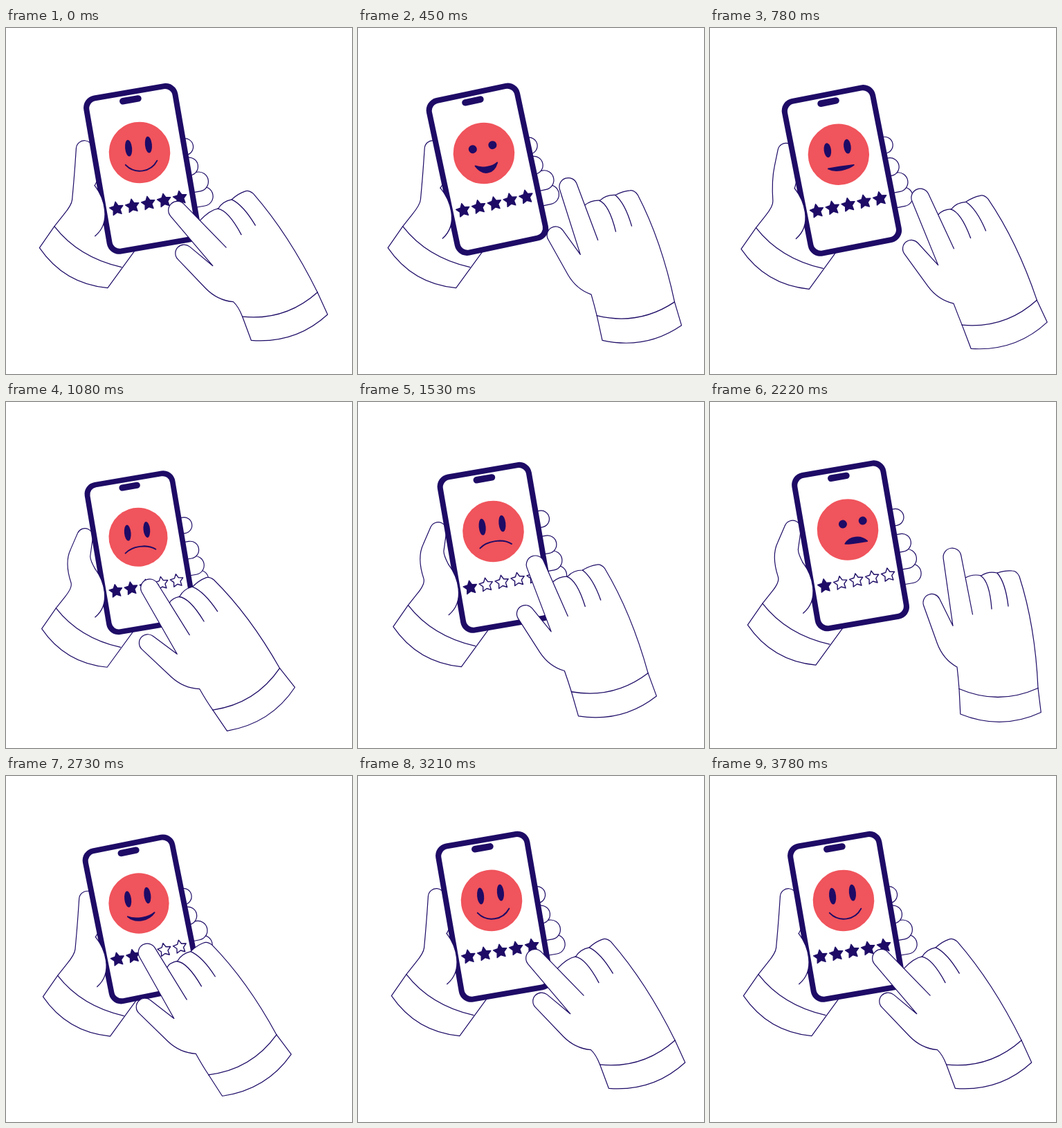
These frames come from a looping animation (500x500 px, 3.81 s). An HTML page with a canvas:

```html
<!DOCTYPE html>
<html lang="en">
<head>
<meta charset="utf-8">
<title>Rating by phone</title>
<style>
html, body { margin: 0; width: 100%; height: 100%; overflow: hidden; background: #fff; }
canvas { display: block; width: 500px; height: 500px; }
</style>
</head>
<body>
<canvas id="stage" width="500" height="500"></canvas>
<script>
const LOOP = 3810, NAVY = '#1e0b66', RED = '#f0545c', RAD = Math.PI / 180;
const PIVOT = 155; // distance from the face down to the point the phone tilts around
const ctx = document.getElementById('stage').getContext('2d');

// grip: pivot x, y, tilt, scale. hand: little finger x, y, palm angle, wrist bend.
// face: mood, width, look. curl: how far the left thumb bends.
const poses = {
  press: { grip: [219.4, 332.7, -9.8, 1], hand: [350, 235, -24, -6], face: [1, 1, 0], curl: 0 },
  lift: { grip: [214.2, 332.6, -12, 1], hand: [398, 235, -9.5, .5], face: [.6, 0, 0], curl: 0 },
  lower: { grip: [215.8, 342, -9.6, .96], hand: [293, 253, -27, 5], face: [-1, 1, 0], curl: 1 },
  leave: { grip: [221.9, 339.7, -9.8, 1], hand: [350, 235, -13, .7], face: [-1, 1, 0], curl: 1 },
  away: { grip: [225.4, 337.2, -9.8, 1], hand: [442, 245, 0, .5], face: [-.6, 0, 9], curl: 1 },
  raise: { grip: [221.9, 333.7, -11.3, .985], hand: [290, 240, -26, 4.5], face: [.45, .55, 0], curl: 0 }
};

// A pose at a time, with the hand slid sideways and the phone kicked towards the viewer.
function key(time, name, slide = 0, kick = 0) {
  const { grip: [x, y, tilt, scale], hand: [hx, ...hand], face, curl } = poses[name];
  return { time, values: [x + 5 * kick, y - 8 * kick, tilt, scale + .07 * kick,
    hx + slide, ...hand, ...face, curl] };
}

const timeline = [
  key(0, 'press'),
  key(450, 'lift'),
  key(680, 'lift', 21),
  key(920, 'lower', 44, .4),
  key(1080, 'lower'),
  key(1230, 'lower', -34, 1),
  key(1530, 'leave'),
  key(1900, 'away', -3),
  key(2220, 'away'),
  key(2320, 'away', 4),
  key(2580, 'raise', -27),
  key(2730, 'raise'),
  key(2940, 'press', -4, .7),
  key(3220, 'press', 8),
  key(3600, 'press')
];

// Looping monotone cubic interpolation of the timeline.
function sample(t) {
  const n = timeline.length;
  const at = i => timeline[(i + n) % n];
  const time = i => at(i).time + LOOP * Math.floor(i / n);
  let i = n - 1;
  while (timeline[i].time > t) i--;
  const span = time(i + 1) - time(i), u = (t - time(i)) / span;
  return at(i).values.map((a, j) => {
    const val = k => at(k).values[j];
    const slope = k => (val(k + 1) - val(k)) / (time(k + 1) - time(k));
    const tangent = k => {
      const p = slope(k - 1), q = slope(k);
      return p * q > 0 ? 2 * p * q / (p + q) : 0;
    };
    const ease = u * u * (3 - 2 * u), v = 1 - u;
    return a + (val(i + 1) - a) * ease
      + span * u * v * (tangent(i) * v - tangent(i + 1) * u);
  });
}

// The swipes empty and refill one star at a time.
function starCount(t) {
  const clamp = n => Math.max(1, Math.min(5, Math.floor(n)));
  return Math.max(clamp(6 - (t - 835) / 82), clamp(1 + (t - 2555) / 92));
}

const off = ([px, py], x, y, a = 0) => [
  px + x * Math.cos(a) - y * Math.sin(a),
  py + x * Math.sin(a) + y * Math.cos(a)
];
const mix = (a, b, k) => [a[0] + (b[0] - a[0]) * k, a[1] + (b[1] - a[1]) * k];
const start = p => ctx.moveTo(...p);
const line = p => ctx.lineTo(...p);
const quad = (c, p) => ctx.quadraticCurveTo(...c, ...p);

// Angle on a circle where the tangent from a point touches it.
function touch(from, c, r, side) {
  const dx = c[0] - from[0], dy = c[1] - from[1];
  return Math.atan2(dy, dx) + side * (Math.PI - Math.acos(r / Math.hypot(dx, dy)));
}

// Rounded fingertip joining the edge from `a` to the edge towards `b`.
function fingertip(a, c, r, b) {
  const end = touch(b, c, r, 1);
  ctx.arc(...c, r, touch(a, c, r, -1), end);
  return [c[0] + r * Math.cos(end), c[1] + r * Math.sin(end)];
}

function paint(fill, width) {
  if (fill) { ctx.fillStyle = fill; ctx.fill(); }
  if (width) { ctx.lineWidth = width; ctx.strokeStyle = NAVY; ctx.stroke(); }
}

function block(x, y, w, h, r, fill) {
  ctx.beginPath();
  ctx.roundRect(x, y, w, h, r);
  paint(fill);
}

function drawLeftHand(tilt, curl) {
  const base = [-124.5, -77], bend = [-121 - 16 * curl, -115], tip = [-106, -158 + 4 * curl];
  const valley = [-84 - 14 * curl, -118];
  ctx.beginPath();
  start([-31, -14]);
  line([-72.5, 43]);
  quad([-135.5, 37], [-171, -15]);
  line([-149.5, -46]);
  line([-136, -63]);
  quad(base, mix(base, bend, .2));
  quad(bend, mix(bend, off(tip, -12, 0), .5));
  fingertip(bend, tip, 12, valley);
  line(off(valley, 0, -6));
  quad(valley, off([0, 0], -72, 36 - PIVOT, tilt));
  paint(null, 1.2);
  ctx.beginPath();
  start([-149.5, -46]);
  quad([-114.5, -1], [-52.5, 13]);
  paint(null, 1.3);
}

function drawBackFingers(curl) {
  const tips = [[80, 78, 14], [77, 56, 14], [67 + 7 * curl, 32, 13], [66 + 5 * curl, 3 - 9 * curl, 12]];
  for (const [x, y, r] of tips) {
    ctx.beginPath();
    ctx.moveTo(x - 35, y - r);
    ctx.arc(x, y, r, -Math.PI / 2, Math.PI / 2);
    ctx.lineTo(x - 35, y + r);
    paint('#fff', 1.2);
  }
}

function drawStar(x, y, filled) {
  ctx.beginPath();
  for (let i = 0; i < 10; i++) {
    const r = i % 2 ? 5.2 : 10.2, a = i * Math.PI / 5;
    ctx.lineTo(x + r * Math.sin(a), y - r * Math.cos(a));
  }
  ctx.closePath();
  paint(filled ? NAVY : '#fff', 1.4);
}

function drawFace(mood, width, look) {
  ctx.beginPath();
  ctx.arc(0, 0, 44.3, 0, 7);
  paint(RED);
  const eye = Math.min(12, 6 + 12 * width);
  for (const side of [-1, 1]) {
    ctx.beginPath();
    ctx.ellipse(look + side * 14.6, -9, 7 - eye / 6, eye, 4 * RAD, 0, 7);
    paint(NAVY);
  }
  const half = 16 + 7 * width, gap = 4 * (1 - width);
  const corner = 17.5 - 3.3 * mood, middle = 20 + 6.2 * mood;
  const lip = (y, side) => {
    const pull = (4 * y - corner) / 3;
    ctx.bezierCurveTo(look - side * half * .5, pull, look + side * half * .5, pull + 1,
      look + side * half, corner + .8 + .8 * side);
  };
  ctx.beginPath();
  ctx.moveTo(look - half, corner);
  lip(middle - gap, 1);
  lip(middle + gap, -1);
  paint(NAVY, 1.9);
}

function drawPhone(face, stars) {
  block(-69, -92.5, 138, 232.5, 18, NAVY);
  block(-61, -84.5, 122, 216.5, 11, '#fff');
  block(-16, -82, 32, 9.5, 4.7, NAVY);
  drawFace(...face);
  for (let i = 0; i < 5; i++) drawStar((i - 2) * 23.3, 74.5, i < stars);
  // Palm wrapping over the edge
  ctx.beginPath();
  ctx.moveTo(-72, 36);
  ctx.bezierCurveTo(-62, 55, -56, 92, -84, 108);
  paint('#fff', 1.3);
}

function drawRightHand(x, y, palmAngle, bend) {
  const palm = palmAngle * RAD, wrist = (palmAngle - bend) * RAD;
  const near = (dx, dy) => off([x, y], dx, dy, palm);
  const mid = near(-25, 169);
  const cuff = (dx, dy) => off(mid, dx, dy, wrist);
  const cuffL = cuff(-57, 0), cuffR = cuff(57, 0);
  const fork = near(-91, 78.5), crease = near(-62.5, 62);
  const tip = near(-93 + 2 * bend, -20.5 - .8 * bend);
  const thumb = near(-121.5, 45), ball = near(-113.6, 104);

  ctx.beginPath();
  start(cuffL);
  quad(cuff(-58, -16), near(-85, 138));
  quad(near(-105, 127), ball);
  fingertip(ball, thumb, 12.5, fork);
  line(fork);
  const edge = fingertip(fork, tip, 13, crease);
  line(crease);
  line(mix(crease, edge, .62));
  quad(near(-62, 3), near(-50, 6));
  quad(near(-40, -1), near(-27, 2));
  quad(near(-15, -2), near(-5, -1));
  quad(near(1, -1), near(5, 7));
  quad(off(mix([x, y], cuffR, .5), 12, -6, palm), cuffR);
  paint('#fff', 1.2);

  ctx.beginPath();
  start(cuffL);
  line(cuff(-55.5, 36.5));
  quad(cuff(4, 61), cuff(61, 35));
  line(cuffR);
  paint('#fff', 1.2);

  ctx.beginPath();
  start(cuffL);
  quad(cuff(0, 25), cuffR);
  start(near(-51, 6));
  quad(near(-38, 14), near(-35, 54));
  start(near(-27, 2));
  quad(near(-15, 16), near(-11, 50));
  paint(null, 1.3);
}

function render(t) {
  const v = sample(t), [x, y, tilt, scale] = v, curl = v[11];
  ctx.fillStyle = '#fff';
  ctx.fillRect(0, 0, 500, 500);
  ctx.lineJoin = ctx.lineCap = 'round';
  ctx.save();
  ctx.translate(x, y);
  ctx.scale(scale, scale);
  drawLeftHand(tilt * RAD, curl);
  ctx.rotate(tilt * RAD);
  ctx.translate(0, -PIVOT);
  drawBackFingers(curl);
  drawPhone(v.slice(8, 11), starCount(t));
  ctx.restore();
  drawRightHand(...v.slice(4, 8));
}

const begin = performance.now();
function tick() {
  render((performance.now() - begin) % LOOP);
  requestAnimationFrame(tick);
}
tick();
</script>
</body>
</html>
```
